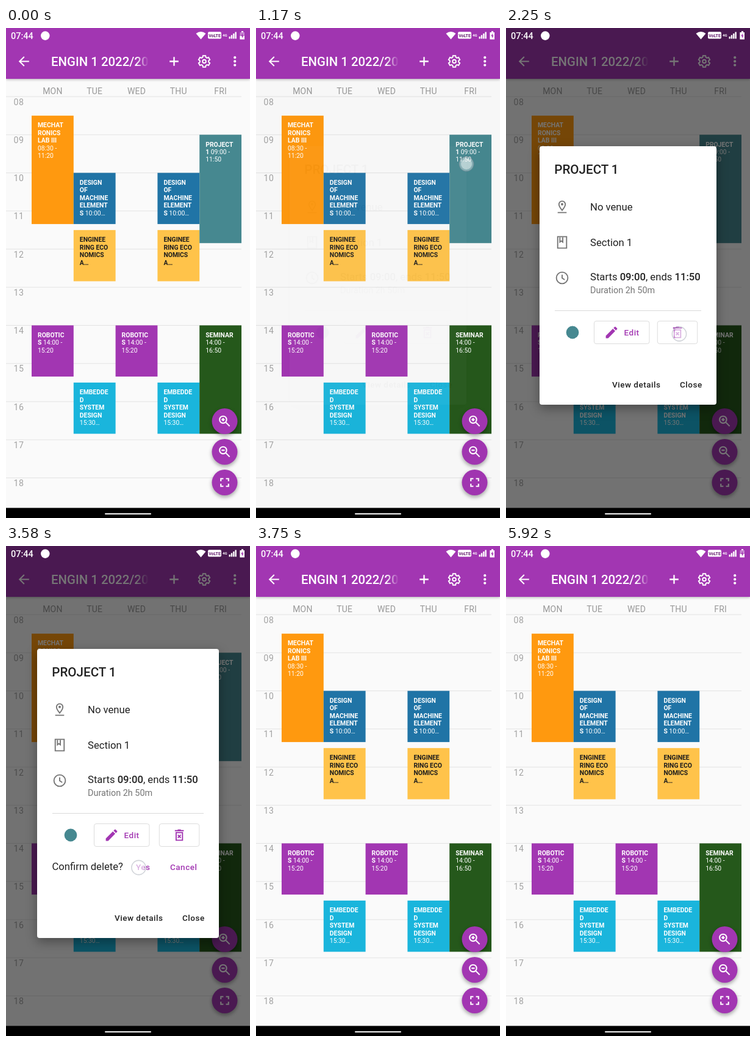
Animation of 400 by 800 pixels, one loop 6.08 s. Source, as an HTML page:

```html
<!DOCTYPE html>
<html lang="en">
<head>
<meta charset="utf-8">
<title>Timetable</title>
<style>
  html, body { margin: 0; width: 100%; height: 100%; overflow: hidden; background: #fafafa; }
  svg { display: block; width: 100vw; height: 100vh; }
  text { font-family: Roboto, "Noto Sans", sans-serif; white-space: pre; }
</style>
</head>
<body>
<svg id="stage" viewBox="0 0 400 800"></svg>
<script>
const PURPLE = '#a236b2', TEAL = '#468890', LOOP = 6080;
const $ = id => document.getElementById(id);

const rect = (x, y, w, h, fill, more = '') =>
  `<rect x="${x}" y="${y}" width="${w}" height="${h}" fill="${fill}" ${more}/>`;
const circle = (x, y, r, fill, more = '') =>
  `<circle cx="${x}" cy="${y}" r="${r}" fill="${fill}" ${more}/>`;
const text = (x, y, size, fill, str, more = '') =>
  `<text x="${x}" y="${y}" font-size="${size}" fill="${fill}" ${more}>${str}</text>`;
const medium = 'font-weight="500"';
const label = (x, y, fill, str) =>
  text(x, y, 13.5, fill, str, medium + ' letter-spacing=".5"');

// Icons are drawn on a 24-unit grid
const icon = (x, y, color, lines, solid = '', width = 2) =>
  `<g transform="translate(${x - 12.5} ${y - 12.5}) scale(1.042)">
    <path d="${lines}" fill="none" stroke="${color}" stroke-width="${width}"/>
    <path d="${solid}" fill="${color}"/></g>`;
const ring = (x, y, r) => `M${x - r} ${y}a${r} ${r} 0 1 1 0 .01z`.replace(' 0 1 1 0 .01z',
  ` 0 1 1 ${2 * r} 0a${r} ${r} 0 1 1 ${-2 * r} 0z`);

function gearPath() {
  const points = [];
  for (let i = 0; i < 6; i++)
    for (const [deg, r] of [[-22, 6.9], [-13, 9.2], [13, 9.2], [22, 6.9]]) {
      const a = (i * 60 + 30 + deg + 60) * Math.PI / 180;
      points.push((12 + r * Math.cos(a)).toFixed(2) + ' ' + (12 + r * Math.sin(a)).toFixed(2));
    }
  return 'M' + points.join('L') + 'z' + ring(12, 12, 2.7);
}

const LENS = ring(9.5, 9.5, 5.5) + 'M13.5 13.5L19.8 19.8M7 9.5h5';
const CORNERS = 'M6 10V6h4M14 6h4v4M18 14v4h-4M10 18H6v-4';
const PIN = 'M12 17.5C9 14 7 10.5 7 8a5 5 0 0 1 10 0c0 2.5-2 6-5 9.5zM5 21h14';
const BOOK = 'M5 3h14v18H5zM8.5 4v7.5l2.2-1.8 2.3 1.8V4';
const CLOCK = ring(12, 12, 9) + 'M12 7v5.3l4 2.5';
const PENCIL = 'M3 17.25V21h3.75L17.81 9.94l-3.75-3.75zM20.71 7.04a1 1 0 0 0 0-1.41' +
  'l-2.34-2.34a1 1 0 0 0-1.41 0l-1.83 1.83 3.75 3.75z';
const BIN = 'M7 8h10v12H7zM5 5h14M9.5 4h5M9.7 11.7l4.6 4.6M14.3 11.7l-4.6 4.6';

const hourY = h => 112 + 62.25 * (h - 8);
const dayX = d => 42 + 68.8 * d;

// In each line, the part before "|" is bold
function card(day, from, to, fill, body, ink = '#fff', id = '') {
  const x = dayX(day), y = hourY(from);
  const lines = body.split('/').map((line, i) => {
    const [bold, plain = ''] = line.split('|');
    return text(x + 10, y + 19.3 + 12.45 * i, 10.4, ink,
      `<tspan font-weight="700">${bold}</tspan>${plain}`);
  });
  return `<g id="${id}">${rect(x, y, 68.8, hourY(to) - y + .6, fill)}${lines.join('')}</g>`;
}

function calendar() {
  let s = rect(0, 0, 400, 800, '#fafafa');
  for (let h = 8; h < 19; h++) {
    s += rect(0, hourY(h) - .5, 386, 1, '#e3e3e3');
    s += text(12.5, hourY(h) + 13.7, 14.2, '#a3a3a3', String(h).padStart(2, '0'), 'letter-spacing=".5"');
  }
  ['MON', 'TUE', 'WED', 'THU', 'FRI'].forEach((name, d) =>
    s += text(dayX(d) + 34.4, 107.8, 14, '#999', name, 'text-anchor="middle" letter-spacing=".2"'));

  s += card(0, 8.5, 11 + 1 / 3, '#ff990f', 'MECHAT/RONICS/LAB III/|08:30 -/|11:20');
  for (const d of [1, 3]) {
    s += card(d, 10, 11 + 1 / 3, '#2074a6', 'DESIGN/OF/MACHINE/ELEMENT/S| 10:00…');
    s += card(d, 11.5, 12 + 5 / 6, '#ffc34a', 'ENGINEE/RING ECO/NOMICS/A…', '#1c1c1c');
    s += card(d, 15.5, 16 + 5 / 6, '#1ab5dc', 'EMBEDDE/D/SYSTEM/DESIGN/|15:30…');
  }
  for (const d of [0, 2])
    s += card(d, 14, 15 + 1 / 3, PURPLE, 'ROBOTIC/S| 14:00 -/|15:20');
  s += card(4, 9, 11 + 5 / 6, TEAL, 'PROJECT/1| 09:00 -/|11:50', '#fff', 'project');
  s += card(4, 14, 16 + 5 / 6, '#25581b', 'SEMINAR/|14:00 -/|16:50');

  [[LENS + 'M9.5 7v5'], [LENS], [CORNERS]].forEach(([path], i) => {
    const y = 642 + 50 * i;
    s += circle(358.5, y, 21, PURPLE, 'style="filter:drop-shadow(0 3px 3px rgba(0,0,0,.35))"');
    s += icon(358.5, y, '#fff', path);
  });
  return s;
}

function header() {
  return rect(0, 0, 400, 83, PURPLE, 'style="filter:drop-shadow(0 1px 2px rgba(0,0,0,.3))"') +
    icon(29.5, 54.5, '#fff', 'M20 12H5.5M12.3 4.7L5 12l7.3 7.3') +
    text(74, 62, 20.4, 'url(#fade)', 'ENGIN 1 2022/20', medium) +
    icon(275.5, 54.5, '#fff', 'M5 12h14M12 5v14', '', 2.2) +
    icon(325, 54.5, '#fff', gearPath(), '', 1.9) +
    [48.2, 54.4, 60.6].map(y => circle(375.2, y, 2.1, '#fff')).join('');
}

function statusBar() {
  let s = text(8, 17.7, 14.5, '#fff', '07:44', medium) + circle(64.3, 12.6, 7.3, '#fff');
  s += '<path d="M311.5 9Q319.5 2.8 327.5 9L319.5 18.6z" fill="#fff"/>';
  s += rect(331, 6.3, 22, 11.2, '#fff', 'rx="2"');
  s += text(342, 14.5, 7, '#6b2575', 'VoLTE', 'text-anchor="middle" font-weight="700"');
  s += text(355, 14.2, 6, '#fff', '4G', 'font-weight="700"');
  for (let i = 0; i < 4; i++)
    s += rect(365.5 + 3.3 * i, 14 - 2.5 * i, 2.4, 3.5 + 2.5 * i, '#fff');
  s += rect(386, 5, 3, 2, '#fff') + rect(383.5, 7, 7.5, 11.5, '#fff', 'opacity=".4"');
  s += rect(383.5, 7, 7.5, 11.5, '#fff', 'id="charge"');
  return s + `<path d="M388 8.8l-2.8 4.4h1.7v3.6l2.7-4.6h-1.6z" fill="${PURPLE}"/>`;
}

// p runs from 0 (plain) to 1 (with the confirm row)
function dialog(p) {
  const w = 290 + 8 * p, h = 422 + 50 * p, dark = '#212121', gray = '#757575';
  const edit = 89.5 + 4 * p, bin = 193.3 + 7 * p;
  const button = 'rx="3.5" stroke="#dcdcdc"';
  const bold = str => `<tspan font-weight="500">${str}</tspan>`;
  return `<g transform="translate(${200 - w / 2} ${193 - 25 * p})">` +
    rect(0, 0, w, h, '#fff', 'rx="4" style="filter:drop-shadow(0 6px 9px rgba(0,0,0,.35))"') +
    text(24.3, 44.6, 20.6, dark, 'PROJECT 1', medium) +
    icon(37, 99, gray, PIN + ring(12, 8, 1), '', 1.8) +
    icon(37, 157, gray, BOOK, '', 1.8) +
    icon(37, 215, gray, CLOCK, '', 1.8) +
    text(83, 104.6, 16.67, dark, 'No venue') +
    text(83, 163, 16.67, dark, 'Section 1') +
    text(83, 219.4, 16.67, dark, `Starts ${bold('09:00')}, ends ${bold('11:50')}`) +
    text(83, 239.6, 14.4, gray, 'Duration 2h 50m') +
    rect(25, 268, w - 50, 1, '#d9d9d9') +
    circle(54 + p, 304, 10.4, TEAL) +
    rect(edit, 285.5, 90.5, 37, '#fff', button) +
    icon(edit + 28.5, 304, PURPLE, '', PENCIL) +
    label(edit + 49, 309, PURPLE, 'Edit') +
    rect(bin, 285.5, 65.5, 37, '#fff', button) +
    icon(bin + 32.8, 304, PURPLE, BIN, '', 1.8) +
    `<g opacity="${p}">` +
    text(24.5, 361, 16.67, dark, 'Confirm delete?') +
    label(162, 361, PURPLE, 'Yes') + label(218, 361, PURPLE, 'Cancel') + '</g>' +
    label(w - 171, h - 28, dark, 'View details') + label(w - 60, h - 28, dark, 'Close') + '</g>';
}

const touch = (id, x, y) => `<g id="${id}" opacity="0">` +
  circle(x, y, 11.6, 'rgba(255,255,255,.35)', 'stroke="#8b93a0" stroke-opacity=".4" stroke-width="1.6"') +
  circle(x, y, 9, 'rgba(255,255,255,.42)') + '</g>';

$('stage').innerHTML = `<defs><linearGradient id="fade" gradientUnits="userSpaceOnUse" x1="213" x2="234">
    <stop stop-color="#fff"/><stop offset="1" stop-color="#fff" stop-opacity="0"/></linearGradient></defs>` +
  calendar() + header() + touch('tapCard', 345, 222) +
  rect(0, 0, 400, 784, '#000', 'id="scrim" opacity="0"') +
  statusBar() + '<g id="dialog"></g>' +
  touch('tapBin', 284, 499.5) + touch('tapYes', 217.5, 525) +
  rect(0, 783.5, 400, 16.5, '#000') + rect(162, 792.2, 76, 2, '#fff', 'rx="1"');

const ramp = (t, from, to) => Math.min(1, Math.max(0, (t - from) / (to - from)));
const easeOut = x => 1 - (1 - x) ** 3;
const easeInOut = x => x * x * (3 - 2 * x);
const opacity = (id, value) => $(id).setAttribute('opacity', value);
const press = (t, down, up) => ramp(t, down, down + 60) * (1 - ramp(t, up, up + 70));

const chargeTop = [13, 7, 7, 7, 7, 10];
let grown = -1;

function draw(t) {
  const shown = easeOut(ramp(t, 1170, 1300)) * (1 - easeInOut(ramp(t, 3600, 3740)));
  const p = easeInOut(ramp(t, 2290, 2490));
  if (p !== grown) $('dialog').innerHTML = dialog(grown = p);
  opacity('dialog', shown);
  opacity('scrim', .54 * shown);
  opacity('project', t < 3660 ? 1 : 0);
  opacity('tapCard', press(t, 960, 1220));
  opacity('tapBin', press(t, 2130, 2290));
  opacity('tapYes', press(t, 3460, 3590));

  const top = chargeTop[Math.floor((t + 250) / 1000) % 6];
  $('charge').setAttribute('y', top);
  $('charge').setAttribute('height', 18.5 - top);
}

const start = performance.now();
(function tick() {
  draw((performance.now() - start) % LOOP);
  requestAnimationFrame(tick);
})();
</script>
</body>
</html>
```
